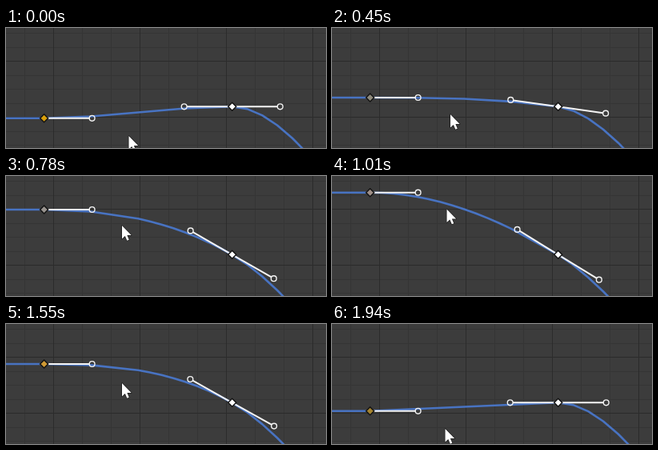
An HTML page with a canvas that plays this animation: 400x150 px, repeating every 1.97 s.

```html
<!DOCTYPE html>
<html lang="en">
<head>
<meta charset="utf-8">
<title>Curve editor</title>
<style>
  html, body { margin: 0; width: 100%; height: 100%; overflow: hidden; background: #3c3c3c; }
  canvas { display: block; }
</style>
</head>
<body>
<canvas id="stage" width="400" height="150"></canvas>
<script>
const ctx = document.getElementById('stage').getContext('2d');
const LOOP = 1970;

// time, key height, cursor x, cursor y
const MOVES = [
  [0, 112.8, 153.5, 135],
  [200, 112.8, 153.5, 135],
  [260, 109, 152, 131],
  [450, 87, 148, 108],
  [750, 46, 145, 66],
  [780, 42, 145, 62],
  [930, 25, 144, 45.5],
  [1010, 20.7, 143.5, 41.5],
  [1310, 20.7, 143.5, 41.5],
  [1370, 24.5, 144, 46.5],
  [1550, 50, 145, 74],
  [1790, 89, 145, 114],
  [1850, 98.6, 144, 122],
  [1940, 108.8, 141.5, 131],
  [1970, 112.8, 141, 135]
];

const KEY_COLORS = [
  [0, '#d99f0a'], [230, '#8e8a7c'], [620, '#98938e'], [900, '#a09088'],
  [1340, '#d09a34'], [1670, '#a09484'], [1880, '#a5842f']
];

const LEFT_X = 47.6;
const MID = { x: 282.7, y: 98.3 };
const END = { x: 582.7, y: 349.3 };
const HANDLE = 60;
const CLAMP = 0.15;

// The picture advances in discrete steps.
function stepTime(t) {
  const snap = from => from + 30 * Math.floor((t - from) / 30);
  if (t < 230) return 0;
  if (t < 270) return 230;
  if (t < 780) return snap(270);
  if (t < 1010) return Math.min(960, snap(780));
  if (t < 1340) return 1010;
  return snap(1340);
}

function sample(t) {
  let i = 0;
  while (i < MOVES.length - 2 && MOVES[i + 1][0] <= t) i++;
  const a = MOVES[i], b = MOVES[i + 1];
  const u = (t - a[0]) / (b[0] - a[0]);
  return a.map((v, k) => v + (b[k] - v) * u).slice(1);
}

// Automatic tangent: average slope, flattened near an extreme.
function midSlope(y) {
  if (y >= MID.y) return 0;
  const slope = (END.y - y) / (END.x - LEFT_X);
  const ratio = (MID.y - y) / (END.y - y);
  return slope * Math.min(1, ratio / CLAMP);
}

function hermite(a, b, slopeA, slopeB) {
  const w = b.x - a.x;
  return x => {
    const u = (x - a.x) / w, u2 = u * u, u3 = u2 * u;
    return a.y + (b.y - a.y) * (3 * u2 - 2 * u3)
      + slopeA * w * (u3 - 2 * u2 + u) + slopeB * w * (u3 - u2);
  };
}

// Splits a span in quarters until it is straight to within a pixel.
function refine(f, x0, x1) {
  const y0 = f(x0), y1 = f(x1);
  const quarters = [0.25, 0.5, 0.75];
  const bent = quarters.some(q =>
    Math.abs(f(x0 + (x1 - x0) * q) - (y0 + (y1 - y0) * q)) > 1);
  if (x1 - x0 > 1 && bent) {
    const w = (x1 - x0) / 4;
    for (let i = 0; i < 4; i++) refine(f, x0 + w * i, x0 + w * (i + 1));
  } else {
    ctx.lineTo(x1, y1);
  }
}

function drawGrid() {
  ctx.fillStyle = '#3c3c3c';
  ctx.fillRect(0, 0, 400, 150);
  for (const major of [false, true]) {
    ctx.fillStyle = major ? '#2b2b2b' : '#353535';
    for (let i = -1; i < 10; i++) {
      if ((i % 3 === 0) === major) ctx.fillRect(59 + 36 * i, 0, 1, 150);
    }
    for (let i = -2; i < 7; i++) {
      if ((i % 4 === 0) === major) ctx.fillRect(0, Math.round(41 + 17.5 * i), 400, 1);
    }
  }
}

function drawCurve(left, slope) {
  ctx.beginPath();
  ctx.moveTo(-5, left.y);
  ctx.lineTo(left.x, left.y);
  refine(hermite(left, MID, 0, slope), left.x, MID.x);
  refine(hermite(MID, END, slope, 0), MID.x, END.x);
  ctx.strokeStyle = '#4873c2';
  ctx.lineWidth = 2.6;
  ctx.lineJoin = 'round';
  ctx.stroke();
}

function drawHandle(key, slope, side) {
  const len = Math.hypot(1, slope);
  const dx = side / len, dy = side * slope / len;
  const r = 3.4;
  ctx.strokeStyle = '#f4f4f4';
  ctx.lineWidth = 2;
  ctx.beginPath();
  ctx.moveTo(key.x, key.y);
  ctx.lineTo(key.x + dx * (HANDLE - r), key.y + dy * (HANDLE - r));
  ctx.stroke();
  ctx.lineWidth = 1.4;
  ctx.beginPath();
  ctx.arc(key.x + dx * HANDLE, key.y + dy * HANDLE, r, 0, 2 * Math.PI);
  ctx.stroke();
}

function polygon(x, y, points) {
  ctx.beginPath();
  points.forEach(([px, py]) => ctx.lineTo(x + px, y + py));
  ctx.closePath();
}

function drawKey(key, color) {
  polygon(key.x, key.y, [[0, -5], [5, 0], [0, 5], [-5, 0]]);
  ctx.fillStyle = color;
  ctx.fill();
  ctx.strokeStyle = '#141414';
  ctx.lineWidth = 1.5;
  ctx.lineJoin = 'miter';
  ctx.stroke();
}

function drawCursor(x, y) {
  polygon(x, y, [[0, 0], [0, 16.5], [3.8, 13], [6.3, 18.8], [8.8, 17.7], [6.4, 12], [11.7, 12]]);
  ctx.strokeStyle = '#1c1c1c';
  ctx.lineWidth = 1.4;
  ctx.lineJoin = 'round';
  ctx.stroke();
  ctx.fillStyle = '#fff';
  ctx.fill();
}

function draw(time) {
  const t = stepTime(time);
  const [y, cursorX, cursorY] = sample(t);
  const left = { x: LEFT_X, y };
  const slope = midSlope(y);
  const color = KEY_COLORS.filter(c => c[0] <= t).pop()[1];
  drawGrid();
  drawCurve(left, slope);
  drawHandle(left, 0, 1);
  drawHandle(MID, slope, -1);
  drawHandle(MID, slope, 1);
  drawKey(left, color);
  drawKey(MID, '#fff');
  drawCursor(cursorX, cursorY);
}

const start = performance.now();
function tick() {
  draw((performance.now() - start) % LOOP);
  requestAnimationFrame(tick);
}
tick();
</script>
</body>
</html>
```
